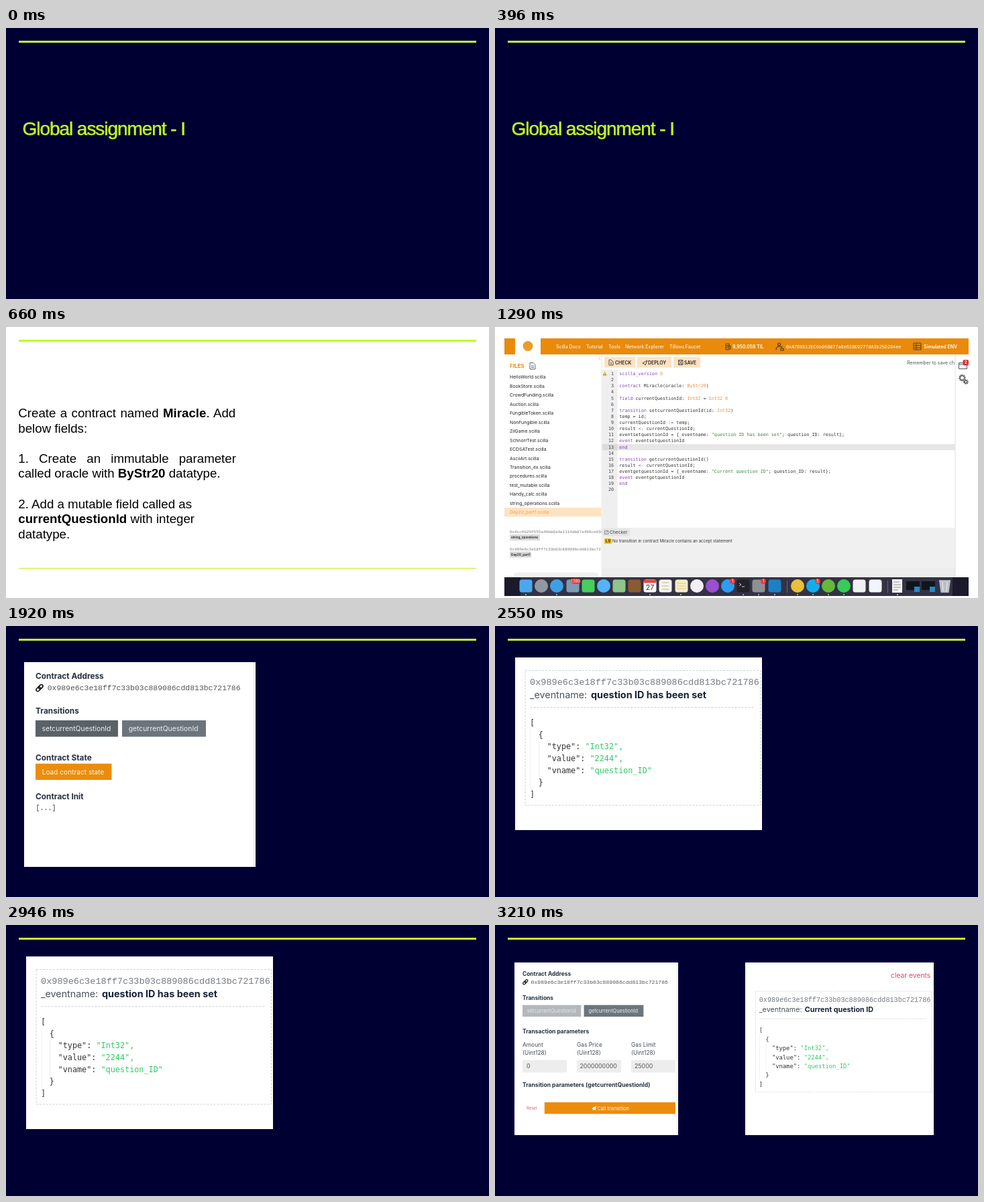
An HTML page for the animation above (3.84 s loop, 720x405 px).

```html
<!DOCTYPE html>
<html lang="en">
<head>
<meta charset="utf-8">
<title>Contract assignment</title>
<style>
  html, body { margin: 0; width: 100%; height: 100%; overflow: hidden; background: #fff; }
  svg { display: block; width: 720px; height: 405px; }
  text { white-space: pre; font-family: Inter, sans-serif; }
  .b { font-weight: 700; }
  .m { font-weight: 600; }
  .arial { font-family: "Liberation Sans", sans-serif; }
  .courier { font-family: "Liberation Mono", monospace; }
  .code { font-family: "DejaVu Sans Mono", monospace; }
</style>
</head>
<body>
<svg id="stage" viewBox="0 0 720 405"></svg>
<script>
const NAVY = '#000033', LIME = '#c1fa1e', ORANGE = '#ec8c0c', INK = '#243142', GREEN = '#2fcb63';
const ADDRESS = '0x989e6c3e18ff7c33b03c889086cdd813bc721786';

const rect = (x, y, w, h, fill, more = '') =>
  `<rect x="${x}" y="${y}" width="${w}" height="${h}" fill="${fill}" ${more}/>`;
const circle = (x, y, r, fill) => `<circle cx="${x}" cy="${y}" r="${r}" fill="${fill}"/>`;
const path = (d, stroke, width = 1, more = '') =>
  `<path d="${d}" fill="none" stroke="${stroke}" stroke-width="${width}" ${more}/>`;
const text = (x, y, size, str, fill = INK, cls = '', more = '') =>
  `<text x="${x}" y="${y}" font-size="${size}" fill="${fill}" class="${cls}" ${more}>${str}</text>`;
const group = (x, y, scale, body) => `<g transform="translate(${x} ${y}) scale(${scale})">${body}</g>`;
const paint = (str, fill) => `<tspan fill="${fill}">${str}</tspan>`;
const page = fill => rect(0, 0, 720, 405, fill);
const darkPage = () => page(NAVY) + rect(19, 19, 682, 3, '#cdee34');

// ---- Title ----
const title = () => darkPage() +
  text(24.5, 160, 28, 'Global assignment - I', LIME, 'arial',
    `letter-spacing="-1.05" stroke="${LIME}" stroke-width=".5"`);

// ---- Task description ----
function task() {
  const bold = s => `<tspan class="b">${s}</tspan>`;
  const lines = [
    [135, `Create a contract named ${bold('Miracle')}. Add`, 1.2],
    [157.5, 'below fields:'],
    [202.5, '1. Create an immutable parameter', 10],
    [225, `called oracle with ${bold('ByStr20')} datatype.`],
    [270.5, '2. Add a mutable field called as'],
    [293, `${bold('currentQuestionId')} with integer`],
    [315.5, 'datatype.'],
  ];
  return page('#fff') + rect(19, 19, 682, 3, '#bffb2c') + rect(19, 360, 682, 1.3, '#c6f53c') +
    lines.map(([y, s, gap = 0]) =>
      text(18.3, y, 18.7, s, '#000', 'arial', `word-spacing="${gap}"`)).join('');
}

// ---- Editor ----
const SOURCE = `scilla_version 0

contract Miracle(oracle: ByStr20)

field currentQuestionId: Int32 = Int32 0

transition setcurrentQuestionId(id: Int32)
temp = id;
currentQuestionId := temp;
result <- currentQuestionId;
eventsetquestionId = {_eventname: "question ID has been set"; question_ID: result};
event eventsetquestionId
end

transition getcurrentQuestionId()
result <- currentQuestionId;
eventgetquestionId = {_eventname: "Current question ID"; question_ID: result};
event eventgetquestionId
end
`;
const FILES = ('HelloWorld BookStore CrowdFunding Auction FungibleToken NonFungible ZilGame SchnorrTest ' +
  'ECDSATest AsciiArt Transition_ex procedures test_mutable Handy_calc string_operations Day20_part1').split(' ');

const highlight = line => line.replace(
  /"[^"]*"|\b(?:scilla_version|contract|field|transition|event|end)\b|\b(?:Int32|ByStr20|0)\b|:=|<-/g,
  s => paint(s.replace('<', '&lt;'),
    s[0] === '"' ? '#3a8a3a' : /Int32|ByStr20|0/.test(s) ? '#f08a3c' : '#8646b4'));

const docIcon = (x, y, w, h, color) =>
  path(`M${x} ${y}h${w - 3}l3 3v${h - 3}h${-w}zM${x + 2} ${y + h * .5}h${w - 4}M${x + 2} ${y + h * .75}h${w - 4}`, color, .9);

function header() {
  const nav = [[91, 'Scilla Docs'], [136, 'Tutorial'], [169, 'Tools'], [194, 'Network Explorer'], [260, 'Tillovu Faucet']];
  return rect(14, 17, 692, 24, '#e98a0b') + rect(30, 17, 38, 24, '#fff') + circle(49, 28.5, 7.5, '#ee9a2a') +
    nav.map(([x, s]) => text(x, 32, 7.05, s, '#fff')).join('') +
    path('M344 25h5v9h-5zM346 28h5v6M344 28h5M344 31h5', '#5b4220', 1) +
    text(354, 32, 6.9, '9,950.058 TIL', '#fff', 'm') +
    path('M419 34q0-5 5-5t3 2M426 32h4v3h-4z', '#4d3a20', 1.2) + path('M421.5 26a2 2 0 1 1 4 0a2 2 0 1 1-4 0', '#4d3a20', 1.2) +
    text(434, 31.5, 6.8, '0xA7D0512EC6b968B77a8e628E9277dA3b25D284ee', '#fff', 'courier') +
    path('M624 24h11v10h-11zM624 27.5h11M624 31h11M628 24v10', '#5b4220', 1) +
    text(639, 32, 7, 'Simulated ENV', '#fff', 'm');
}

function sidebar() {
  const tag = (y, w, s) => rect(22, y, w, 9, '#d9d9d9', 'rx="1"') + text(24, y + 6.3, 4.7, s, '#333', 'b');
  return text(22, 61, 8, 'FILES', ORANGE, 'b') + docIcon(52, 53.5, 8, 9.5, '#555') +
    path('M157 45l-2 2l2 2', '#bbb', .7) +
    rect(14, 270, 144.5, 13.5, '#fde3c3') +
    FILES.map((name, i) =>
      text(22, 77.3 + i * 13.47, 6.85, name + '.scilla', i === 15 ? '#f0a443' : '#222')).join('') +
    text(22, 308, 5.96, '0x0cc6b29f555e49bb0a4e1114db87e496ce69c', '#777', 'courier') + tag(310, 45, 'string_operations') +
    text(22, 333.5, 5.96, ADDRESS.slice(0, 38), '#777', 'courier') + tag(335.5, 32, 'Day20_part1') +
    rect(28, 367, 126, 10, '#efefef', 'rx="4"') + rect(158.5, 41, 1, 333, '#e6e6e6');
}

function editor() {
  const step = 9.13;
  const buttons = [[163, 46, 'CHECK'], [212, 51, 'DEPLOY'], [266, 40, 'SAVE']].map(([x, w, s]) =>
    rect(x, 45, w, 15.5, '#fde2c1') + text(x + 16, 55.6, 6.9, s, '#222', 'm')).join('');
  const icons = docIcon(170, 49, 6, 8, '#444') + path('M220 54l7-4l-3 7l-1.5-2z', '#444', 1) +
    path('M273.5 49.5h6.5v7h-6.5zM275 49.5v2.5h3.5v-2.5M275 56.5v-2.5h3.5v2.5', '#444', .9);
  const lines = SOURCE.split('\n').map((line, i) => {
    const y = 72 + i * step;
    return text(177, y, 6.73, i + 1, '#444', 'code', 'text-anchor="end"') +
      text(185.3, y, 6.73, highlight(line), '#333', 'code');
  }).join('');
  return buttons + icons +
    text(614, 55.5, 6.95, 'Remember to save ch', '#555') +
    rect(160, 64, 22.5, 236, '#efefef') + rect(160, 175, 526, 9.2, '#e6e6e6') + rect(160, 175, 22.5, 9.2, '#dadada') +
    '<path d="M160.5 72.5l3.2-6l3.2 6z" fill="#c9a227"/>' + rect(163.3, 68.5, .9, 2.3, '#fff') + lines +
    rect(160, 300, 526, 74, '#f0f0f0') + rect(160, 301, 41, 11.5, '#e4e4e4') +
    path('M163.5 304.5h5.5v5h-5.5zM165 308l3-3', '#777', .8) + text(171, 309.3, 6.7, 'Checker', '#444') +
    rect(163, 316, 11, 8, '#f6bd16', 'rx="1"') + text(164.8, 322.3, 6, 'L9', '#333', 'b') +
    text(175, 322.3, 6.1, 'No transition in contract Miracle contains an accept statement', '#333') +
    rect(160, 360, 526, 14, '#ececec') + rect(685.5, 41, 1, 333, '#e0e0e0');
}

function tools() {
  const gear = (x, y, r) => path(`M${x - r} ${y}a${r} ${r} 0 1 0 ${2 * r} 0a${r} ${r} 0 1 0 ${-2 * r} 0`, '#555', 2.2, 'stroke-dasharray="1.7 .7"') +
    `<circle cx="${x}" cy="${y}" r="${r - 1}" fill="none" stroke="#555" stroke-width=".9"/>`;
  return path('M691.5 53.5h12v9h-12zM691.5 56h12', '#555', 1) + rect(697.5, 49, 8.5, 8.5, '#d9303c', 'rx="2"') +
    text(700, 55.4, 6, '2', '#fff', 'b') + gear(696.5, 76, 4) + gear(702, 82, 2.6);
}

function dock() {
  const square = 'finder#4aa8ee mail#7d9cb4 video#45cf5b map#8fc48a book#8a5a32 list#f4f4f2 note#f7edc4 term#20232a gear#8d9094 edit#1f7fc4 cup#eef0f2 slide#f0f6fb';
  const color = name => square.match(new RegExp(name + '(#\\w+)'))[1];
  const tile = (x, fill) => rect(x - 9.5, 377.5, 19, 19, fill, 'rx="3.5"');
  const disc = (x, fill) => circle(x, 387, 10, fill);
  const badge = (x, s, w = 8) => rect(x - w / 2, 376, w, 8, '#ea3b35', 'rx="4"') +
    text(x, 382.2, 5.5, s, '#fff', '', 'text-anchor="middle"');
  const tiles = [[46, 'finder'], [116, 'mail'], [139, 'video'], [185, 'map'], [208, 'book'], [254, 'list'], [278, 'note'],
    [370, 'term'], [393, 'gear'], [417, 'edit'], [543, 'cup'], [567, 'slide']];
  const discs = [[69, '#9099a2'], [92, '#3f9fe6'], [162, '#54b4f7'], [301, '#f3eef6'], [324, '#9b4fd3'],
    [347, '#2b9df4'], [451, '#e9bf3b'], [474, '#13aeea'], [497, '#65b83c'], [520, '#36cb5a']];
  const windows = [623, 646].map(x => rect(x - 10, 380, 20, 13, '#10151c') + rect(x + 2, 388, 8, 8, '#2588c8')).join('');
  return rect(14, 374, 692, 28, '#1b1a2a') + rect(38, 374, 644, 28, '#343244') +
    tiles.map(([x, name]) => tile(x, color(name))).join('') + discs.map(d => disc(...d)).join('') +
    tile(231, '#fafafa') + rect(222, 378, 18, 4.5, '#e34b41') + text(231, 393, 10.5, '27', '#333', '', 'text-anchor="middle"') +
    path('M249 382h10M249 387h10M249 392h10', '#d5a84c', .9) + path('M271 383h13M271 387h13M271 391h13', '#c8b98d', .7) +
    path('M364 383l3 2l-3 2M368 388h4', '#ddd', .9) + path('M435.5 379v18M585.5 379v18', '#777386', .8) +
    rect(592, 377, 15, 20, '#f3f3f3') + path('M594 381h9M594 385h11M594 389h11M594 393h7', '#888', .9) + windows +
    '<path d="M662 379h17l-2.5 18h-12z" fill="#b9bec4"/>' + path('M662 379h17M667 381l1 14M674 381l-1 14', '#e8eaec', 1.2) +
    badge(120, '1,590', 14) + badge(354, '1') + badge(400, '1') + badge(481, '5') +
    [46, 92, 231, 277, 370, 393, 417, 451, 474, 497, 520, 600].map(x => circle(x, 400, .9, '#ddd')).join('');
}

const ide = () => page('#fff') + sidebar() + header() + editor() + tools() + dock();

// ---- Contract panel, shared by two scenes; y = 0 is the first baseline ----
function contractHead(x, y, scale, busy) {
  const link = '<g transform="rotate(-45)" fill="none" stroke="#111" stroke-width="1.7">' +
    '<rect x="-6.2" y="-2.3" width="7.4" height="4.6" rx="2.3"/><rect x="-1.2" y="-2.3" width="7.4" height="4.6" rx="2.3"/></g>';
  return group(x, y, scale,
    text(0, 0, 11.85, 'Contract Address', INK, 'b') + group(6, 13.3, 1, link) +
    text(17.7, 17, 11.43, ADDRESS, '#555', 'courier') +
    text(0, 51.5, 11.85, 'Transitions', INK, 'b') +
    rect(0, 61.7, 123, 24.5, busy ? '#b4b8bc' : '#5a6268') + text(9.5, 77.7, 10.35, 'setcurrentQuestionId', busy ? '#e6e8ea' : '#f0f0f0') +
    rect(129, 61.7, 125, 24.5, '#6c757d') + text(138.7, 77.7, 10.35, 'getcurrentQuestionId', '#f0f0f0'));
}

const contract = () => darkPage() + rect(27, 54, 345, 306, '#fff') + rect(369, 54, 1, 306, '#e4e6ea') +
  contractHead(44, 79.3, 1, false) +
  text(44, 201, 11.85, 'Contract State', INK, 'b') + rect(44, 205.7, 113.5, 24.3, ORANGE) +
  text(53.7, 221.6, 10.15, 'Load contract state', '#fff5e6') +
  text(44, 259, 11.85, 'Contract Init', INK, 'b') + text(44.5, 275, 10, '[...]', '#333', 'courier');

// ---- Event card, shared by two scenes ----
function eventCard(x, y, scale, name) {
  const dash = 'stroke-dasharray="3 2"';
  const pair = (key, value) => `"${key}": ` + paint(`"${value}"`, GREEN);
  const json = [[0, '['], [1, '{'], [2, pair('type', 'Int32') + paint(',', GREEN)], [2, pair('value', '2244') + paint(',', GREEN)],
    [2, pair('vname', 'question_ID')], [1, '}'], [0, ']']];
  return group(x, y, scale,
    path('M0 0h350.5v201.5h-350.5z', '#ccd0d4', 1, dash) + path('M7.5 55h335', '#ccd0d4', 1, dash) +
    text(7, 21.3, 13.57, ADDRESS, '#747a82', 'courier') +
    text(7, 41.7, 14.3, '_eventname:', '#4a525c') + text(98, 41.7, 14.4, name, '#17233a', 'b') +
    path('M8 87v90M20.5 105v54', '#d4d4d4', .8, 'stroke-dasharray="1 1"') +
    json.map(([depth, s], i) => text(7 + depth * 12.8, 82.2 + i * 17.85, 11.8, s, '#333', 'code')).join(''));
}

const eventSet = () => darkPage() + rect(30, 47, 368, 258, '#fff') + eventCard(45, 66.5, 1, 'question ID has been set');

// ---- Call form beside its event ----
function call() {
  const fields = [[41, 47, 'Amount', '0'], [122, 126.5, 'Gas Price', '2000000000'], [203, 208, 'Gas Limit', '25000']];
  return darkPage() + rect(29, 56, 244, 258, '#fff') + rect(271, 56, 1, 258, '#e4e6ea') +
    contractHead(41, 75.8, .71, true) +
    text(41, 161.7, 8.5, 'Transaction parameters', INK, 'b') +
    fields.map(([x, tx, label, value]) => text(x, 182, 8.4, label, '#444d57') + text(x, 194, 8.4, '(Uint128)', '#444d57') +
      rect(x, 201.8, 66, 18.7, '#ededed') + text(tx, 214.4, 8.8, value, '#555')).join('') +
    text(41, 241.6, 8.55, 'Transition parameters (getcurrentQuestionId)', INK, 'b') +
    text(47, 276.2, 5.9, 'Reset', '#e4586a') + rect(73.8, 265, 195.2, 17.3, ORANGE) +
    '<path d="M144 274.3l7-4l-1.2 6.6l-2.3-1l-1.4 1.5v-2.2z" fill="#fff"/>' +
    text(152.5, 276.6, 7.35, 'Call transition', '#fff5e6') +
    rect(373, 56, 281, 258, '#fff') + text(590, 79.3, 10.3, 'clear events', '#dc4c5c') +
    eventCard(388.5, 99, .748, 'Current question ID');
}

const stage = document.getElementById('stage');
const scenes = [[0, title], [660, task], [1290, ide], [1920, contract], [2550, eventSet], [3210, call]];
stage.innerHTML = scenes.map(([, draw]) => `<g>${draw()}</g>`).join('');

const LOOP = 3840;
const start = performance.now();
function tick() {
  const t = (performance.now() - start) % LOOP;
  const current = scenes.findLastIndex(([from]) => t >= from);
  [...stage.children].forEach((g, i) => { g.style.display = i === current ? '' : 'none'; });
  requestAnimationFrame(tick);
}
tick();
</script>
</body>
</html>
```
